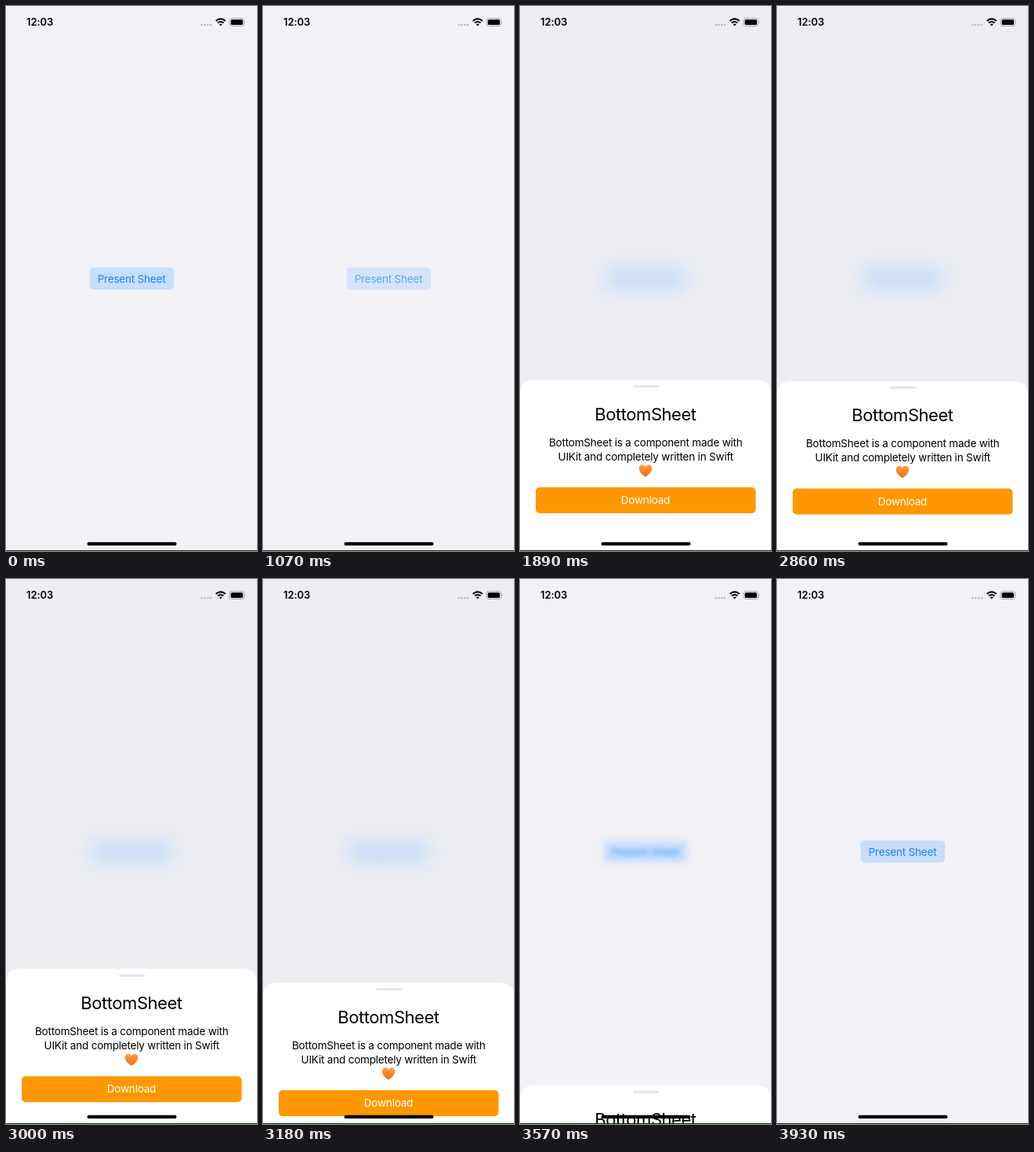
Animation, 320 px wide and 693 px high, one loop 4070 ms. Source, as an HTML page:

```html
<!DOCTYPE html>
<html lang="en">
<head>
<meta charset="utf-8">
<title>Bottom sheet</title>
<style>
  html, body { margin: 0; width: 100%; height: 100%; overflow: hidden; background: #f2f2f7; }
  svg { display: block; width: 320px; height: 693px; }
  text { font: 13.5px Inter, "Liberation Sans", sans-serif; letter-spacing: -.2px; }
  .mid { text-anchor: middle; }
  .title { font-size: 22px; letter-spacing: -.45px; }
  .clock { font-size: 13px; font-weight: 600; letter-spacing: -.1px; }
</style>
</head>
<body>
<svg viewBox="0 0 320 693">
  <defs>
    <linearGradient id="heart" x1="0" y1="0" x2="0" y2="1">
      <stop offset="0" stop-color="#ffa045"/>
      <stop offset="1" stop-color="#e8701a"/>
    </linearGradient>
  </defs>

  <rect id="bg" width="320" height="693" fill="#f2f2f7"/>

  <g id="present">
    <rect x="106.5" y="332.5" width="107.5" height="28" rx="5" fill="#c8defd"/>
    <text class="mid" x="160" y="351.7" fill="#1583fd">Present Sheet</text>
  </g>

  <!-- drawn with its top edge at y = 0 -->
  <g id="sheet">
    <path d="M0 18Q0 0 18 0H302Q320 0 320 18V260H0Z" fill="#fff"/>
    <rect x="144" y="6.8" width="33" height="3" rx="1.5" fill="#e4e4e8"/>
    <text class="mid title" x="160" y="51.5">BottomSheet</text>
    <text class="mid" x="160.3" y="84">BottomSheet is a component made with</text>
    <text class="mid" x="160.3" y="102">UIKit and completely written in Swift</text>
    <path d="M160 123.2C155 120 151.8 116.600 151.800 112.500C151.800 107 158 106.300 160 110.600C162 106.300 168.200 107 168.200 112.500C168.200 116.600 165 120 160 123.200Z" fill="url(#heart)"/>
    <rect x="20" y="136.500" width="280.500" height="33" rx="5" fill="#ff9800"/>
    <text class="mid" x="160" y="157.600" fill="#fff">Download</text>
  </g>

  <text class="clock" x="26" y="25.200">12:03</text>
  <g fill="#bcbcc1">
    <circle cx="249.700" cy="24" r="1.350"/>
    <circle cx="253.500" cy="24" r="1.350"/>
    <circle cx="257.300" cy="24" r="1.350"/>
    <circle cx="261.100" cy="24" r="1.350"/>
  </g>
  <g fill="none" stroke="#000" stroke-width="2">
    <path d="M267.600 19.100Q273.700 13.700 279.800 19.100"/>
    <path d="M269.900 21.600Q273.700 18.300 277.500 21.600"/>
  </g>
  <path d="M271.700 23.300Q273.700 21.700 275.700 23.300L273.700 25.400Z"/>
  <rect x="285" y="15.700" width="18.600" height="9.800" rx="2.800" fill="none" stroke="#a3a8a3"/>
  <rect x="286.600" y="17.200" width="15.400" height="6.800" rx="1.500"/>
  <path d="M304.700 19Q306.300 20.600 304.700 22.200Z" fill="#a3a8a3"/>

  <rect x="103.500" y="681.800" width="114" height="4.200" rx="2.100"/>
  <rect y="692" width="320" height="1" fill="#0b3d10"/>
</svg>

<script>
const LOOP = 4070, OPEN = 475.5, HIDDEN = 692;
const SHOW = 1140, DRAG = 2850, RELEASE = 3360, GONE = 3850, PULL = 46.8;
// Bursts of motion: first update, interval, number of updates
const BURSTS = [[1070, 35.7, 15], [1610, 40, 8], [2860, 35.7, 15], [3390, 39.17, 13], [3930, 140, 1]];

const [bg, present, sheet] = ["bg", "present", "sheet"].map(id => document.getElementById(id));
const clamp = v => Math.min(1, Math.max(0, v));
const mix = (a, b, k) => a + (b - a) * k;

// Share of the way still left for a critically damped spring
function left(ms, speed) {
  const x = Math.max(0, ms) / 1000 * speed;
  return (1 + x) * Math.exp(-x);
}

function stepped(t) {
  let held = 0;
  for (const [start, gap, count] of BURSTS) {
    if (t < start) break;
    const n = Math.min(count - 1, Math.floor((t - start) / gap + .1));
    held = start + n * gap;
  }
  return held;
}

function pressAlpha(t) {
  if (t < 1070) return 1;
  if (t < SHOW) return mix(.68, .5, clamp((t - 1070) / 35));
  return mix(.5, 1, clamp((t - SHOW) / 360));
}

function draw(t) {
  let shown, top;
  if (t < RELEASE - 5) {
    shown = t < 1880 ? 1 - left(t - SHOW, 13.8) : 1;
    const u = clamp((t - DRAG) / (RELEASE - DRAG));
    top = mix(HIDDEN, OPEN, shown) + PULL * (1 - (1 - u) ** 1.6);
  } else {
    shown = t < GONE ? left(t - RELEASE, 13.5) : 0;
    top = mix(HIDDEN, OPEN + PULL, shown);
  }
  sheet.setAttribute("transform", `translate(0 ${top.toFixed(2)})`);
  sheet.style.visibility = shown > 0 ? "visible" : "hidden";
  bg.setAttribute("fill", `rgb(${mix(242, 238, shown)} ${mix(242, 238, shown)} ${mix(247, 242, shown)})`);
  present.style.opacity = pressAlpha(t) * mix(1, .72, shown);
  present.style.filter = shown > 0 ? `blur(${(13 * shown).toFixed(2)}px)` : "none";
}

const began = performance.now();
function tick() {
  draw(stepped((performance.now() - began) % LOOP));
  requestAnimationFrame(tick);
}
tick();
</script>
</body>
</html>
```
